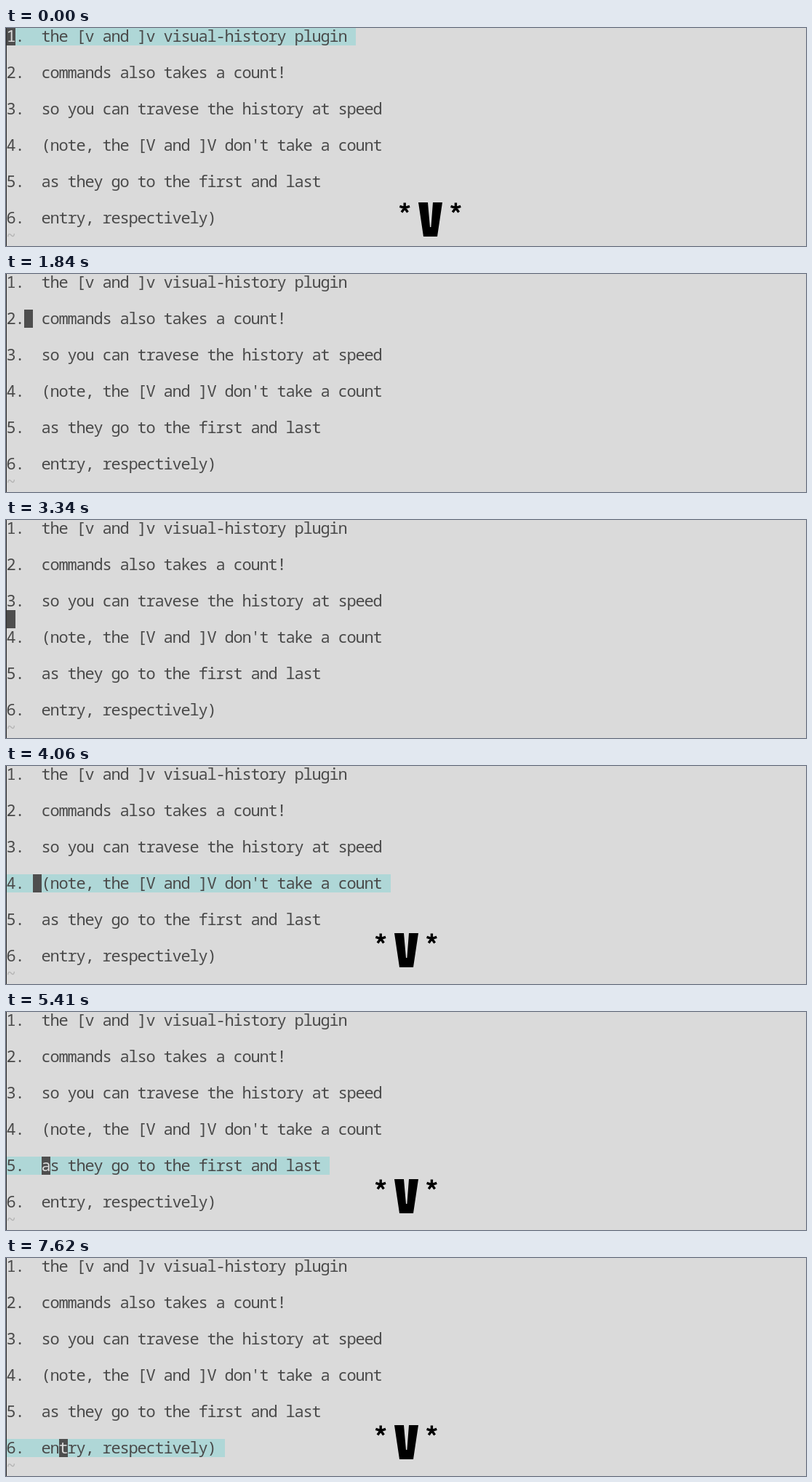
An HTML page that plays this animation: 1100x300 px, repeating every 8 s.

```html
<!DOCTYPE html>
<html lang="en">
<head>
<meta charset="utf-8">
<title>Visual history</title>
<style>
  html, body { margin: 0; width: 100%; height: 100%; overflow: hidden; background: #dadada; }
  svg { display: block; width: 1100px; height: 300px; }
  text { font: 22px "Noto Sans Mono", "DejaVu Sans Mono", monospace; fill: #4a4a4a; white-space: pre; }
  #tilde { fill: #b2b2b2; }
  #select { fill: #afd7d7; }
  #match { fill: #bcbcbc; }
  #cursor { fill: #4e4e4e; }
  #under { fill: #dadada; }
</style>
</head>
<body>
<svg viewBox="0 0 1100 300">
  <rect width="1100" height="300" fill="#dadada"/>
  <rect width="1" height="300" fill="#2a2a2a"/>
  <rect id="select" height="25"/>
  <rect id="match" width="12" height="25"/>
  <g id="lines"></g>
  <text id="tilde">~</text>
  <rect id="cursor" width="12" height="25"/>
  <text id="under"></text>
  <g id="keys" role="img" aria-label="*V*">
    <path d="M534 230H547L550 264H551.4L554 230H567L560 277H541Z"/>
    <path id="stars" stroke="#000" stroke-width="3.4" fill="none"/>
  </g>
</svg>
<script>
const CELL = 12, ROW = 25, LOOP = 8000;
const lines = [
  "1.  the [v and ]v visual-history plugin",
  "2.  commands also takes a count!",
  "3.  so you can travese the history at speed",
  "4.  (note, the [V and ]V don't take a count",
  "5.  as they go to the first and last",
  "6.  entry, respectively)"
];
// When each line gets selected.
const selectAt = [0, 1320, 2690, 4060, 5410, 6770];
const LEAD = 300;

const el = id => document.getElementById(id);
const set = (node, attrs) => {
  for (const key in attrs) node.setAttribute(key, attrs[key]);
};
const show = (node, on) => { node.style.display = on ? "" : "none"; };
const left = col => 1 + col * CELL;
const rowTop = row => row * ROW - 1;

// One x per character keeps the text on the terminal grid.
function place(node, text, row, col = 0) {
  node.textContent = text;
  set(node, { x: [...text].map((c, i) => left(col + i) - 0.6).join(" "), y: rowTop(row) + 20 });
}

function star(x, y, r = 7.2) {
  let d = "";
  for (let i = 0; i < 5; i++) {
    const a = (i * 0.4 - 0.5) * Math.PI;
    d += `M${x} ${y}L${x + r * Math.cos(a)} ${y + r * Math.sin(a)}`;
  }
  return d;
}

lines.forEach((line, i) => {
  const node = document.createElementNS("http://www.w3.org/2000/svg", "text");
  el("lines").append(node);
  place(node, line, i * 2);
});
place(el("tilde"), "~", 11);
set(el("match"), { x: left(lines[5].indexOf(")")), y: rowTop(10) });
set(el("stars"), { d: star(515.2, 237.6) + star(585.4, 237.6) });

// Each line: land, select, step right, deselect, drop to the blank row.
// The beat slows a little from line to line; the last one is held.
function pose(time) {
  const n = selectAt.findLastIndex(t => t - LEAD <= time);
  const last = n === lines.length - 1;
  const since = time - selectAt[n];
  const right = last ? 850 : 290 + 25 * n;
  const off = last ? LOOP : 500 + 20 * n;
  if (since >= off + 110) return { row: 2 * n + 1, col: 0, selected: false };
  return {
    row: 2 * n,
    col: n + (since >= right ? 1 : 0),
    selected: since >= 0 && since < off
  };
}

function draw(time) {
  const { row, col, selected } = pose(time);
  const line = row % 2 ? "" : lines[row / 2];
  const char = line[col] || " ";
  set(el("cursor"), { x: left(col), y: rowTop(row) });
  place(el("under"), char, row, col);
  set(el("select"), { x: 1, y: rowTop(row), width: (line.length + 1) * CELL });
  set(el("keys"), { transform: row ? "" : "translate(33 10)" });
  show(el("select"), selected);
  show(el("keys"), selected);
  show(el("match"), char === "(");
}

const start = performance.now();
function tick() {
  draw((performance.now() - start) % LOOP);
  requestAnimationFrame(tick);
}
tick();
</script>
</body>
</html>
```
